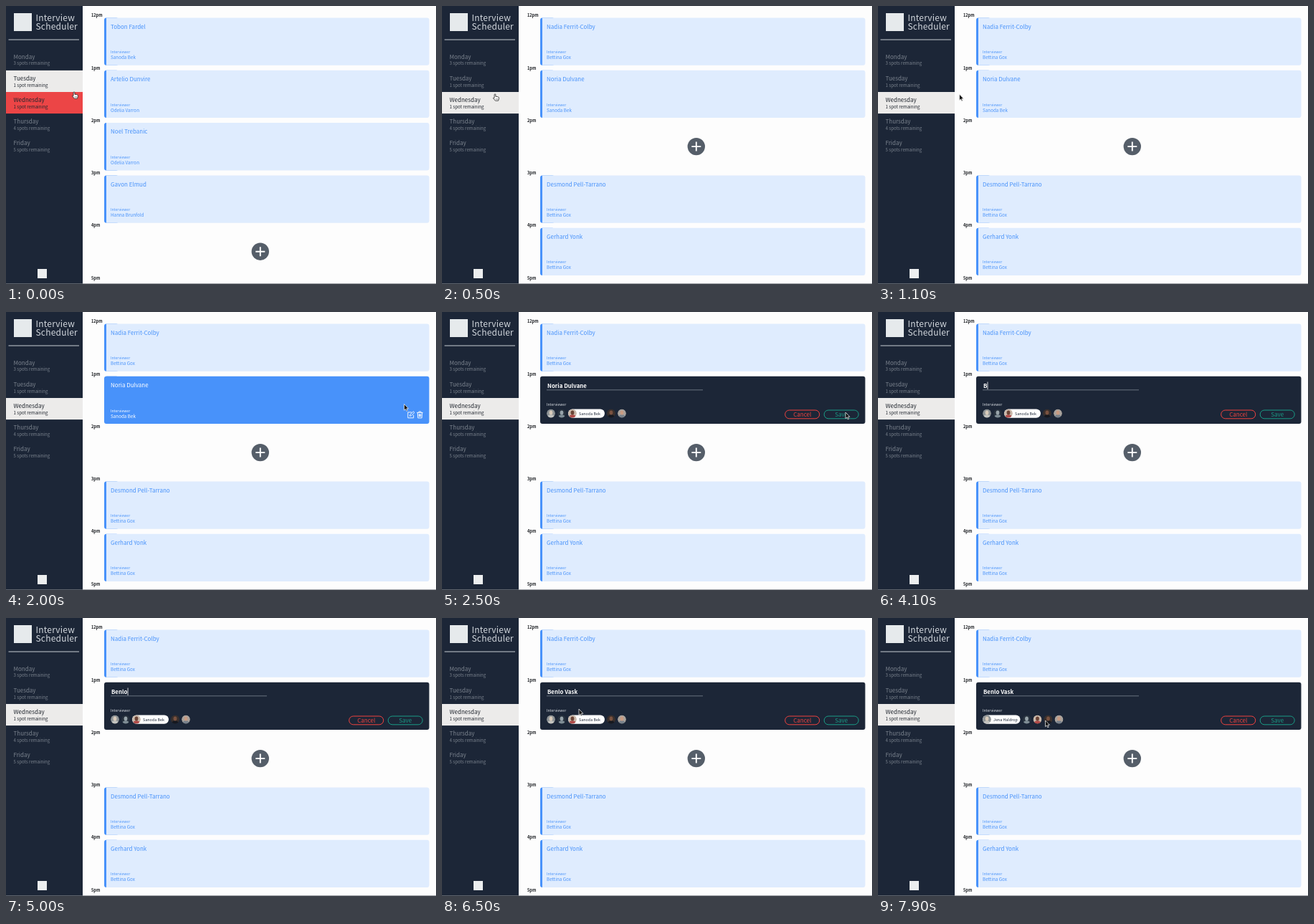
Write an HTML page that moves like this. It is 600 by 388 pixels and loops after 8000 ms.

```html
<!DOCTYPE html>
<html lang="en">
<head>
<meta charset="utf-8">
<title>Interview Scheduler</title>
<style>
  html, body { margin: 0; width: 100%; height: 100%; overflow: hidden; background: #fdfdfd; }
  svg { display: block; width: 600px; height: 388px; }
  text { font-family: "Noto Sans CJK JP", "Noto Sans CJK SC", "Noto Sans CJK", "Noto Sans", sans-serif; white-space: pre; }
</style>
</head>
<body>
<svg id="stage" viewBox="0 0 600 388" xmlns="http://www.w3.org/2000/svg">
  <defs>
    <clipPath id="round"><circle r="6"/></clipPath>
  </defs>
  <rect width="600" height="388" fill="#fdfdfd"/>
  <g id="board"></g>
  <g id="form">
    <rect x="137" y="89.8" width="453.5" height="66.3" rx="3" fill="#1c2637"/>
    <rect id="selection" x="146.5" y="97" height="11.5" fill="#5c82ae"/>
    <path d="M146 108.8H364" stroke="#7d8692" stroke-width=".8"/>
    <text id="field" x="147" y="106" font-size="7.9" font-weight="700" fill="#fff"></text>
    <rect id="caret" y="97.5" width=".8" height="10.5" fill="#fff"/>
    <text x="146" y="130.8" font-size="5.1" fill="#dfe3e8">Interviewer</text>
    <g id="people"></g>
    <g id="buttons"></g>
  </g>
  <g id="sidebar">
    <rect width="107" height="388" fill="#1c2637"/>
    <rect x="11" y="10" width="25" height="25" fill="#e6eaec"/>
    <g font-size="12" font-weight="300" fill="#d3d8de" letter-spacing=".2">
      <text x="41.5" y="21.3">Interview</text>
      <text x="41.5" y="32.7">Scheduler</text>
    </g>
    <path d="M3.5 47H102" stroke="#c9ced4" stroke-width="1"/>
    <g id="days"></g>
    <rect x="44" y="367" width="13" height="13" fill="#eceeef"/>
  </g>
  <path d="M0 387.6H600" stroke="#777c82" stroke-width=".8"/>
  <g id="cursor"></g>
</svg>
<script>
const LOOP = 8000;
const ROW = 73.3;
const BLUE = "#4892fa";
const $ = id => document.getElementById(id);

const days = [["Monday", 3], ["Tuesday", 1], ["Wednesday", 1], ["Thursday", 4], ["Friday", 5]];
const hours = ["12pm", "1pm", "2pm", "3pm", "4pm", "5pm"];
const bookings = {
  1: [["Tobon Fardel", "Sanoda Bek"], ["Artelio Dunvire", "Odelia Varron"],
      ["Noel Trebanic", "Odelia Varron"], ["Gavon Elmud", "Hanna Brunfold"], null],
  2: [["Nadia Ferrit-Colby", "Bettina Gox"], ["Noria Dulvane", "Sanoda Bek"], null,
      ["Desmond Pell-Tarrano", "Bettina Gox"], ["Gerhard Yonk", "Bettina Gox"]]
};
// Avatars: backdrop, head, shoulders; pill width and name where one gets selected.
const people = [
  { tones: ["#8f9496", "#d9cbbb", "#c4c4c0"], name: "Jena Haldrop", pill: 52.5 },
  { tones: ["#28323e", "#98a4aa", "#7f8d95"] },
  { tones: ["#c9b8aa", "#6b4436", "#b04a48"], name: "Sanoda Bek", pill: 51 },
  { tones: ["#3a302d", "#7a5240", "#15181f"] },
  { tones: ["#a9a29c", "#c99b83", "#78818b"] }
];

// Moments of the story, in ms.
const PICK_DAY = 300, OPEN_FORM = 2500, FOCUS = 2950, SELECT = 3100;
const HIDE = 3900, SHOW = 6250, PICK_PERSON = 7000;
const OLD_NAME = "Noria Dulvane", NEW_NAME = "Benlo Vask";
const keyTimes = [4000, 4200, 4400, 4600, 4800, 5500, 5600, 5700, 5850, 6000];

// Pointer tip: time, x, y.
const path = [
  [0, 95, 120], [500, 74, 123], [950, 74, 123], [1800, 548, 124], [2000, 555.5, 128.5],
  [2300, 563, 140], [2550, 563, 140], [3050, 241, 100], [SHOW, 241, 100],
  [6500, 191, 127], [6850, 153, 141], [7250, 153, 141], [7750, 233.5, 143], [LOOP, 233.5, 143]
];

const pointers = {
  arrow: `<path d="M0 0V8.6L2 6.9L3.3 9.8L4.7 9.2L3.4 6.3H6Z" fill="#111" stroke="#fff" stroke-width=".7"/>`,
  hand: `<path d="M-.9 4.6V.8a.9.9 0 0 1 1.8 0V3.3Q4.4 3.3 5.4 4.6V6.5L4.5 9.2H.4L-2.6 5.6Q-2.4 4.4-.9 5.4Z"
    fill="#fff" stroke="#222" stroke-width=".8"/><path d="M1 6V8M2.5 6V8M3.9 6V8" stroke="#222" stroke-width=".4"/>`,
  beam: `<path d="M-2-4.3Q0-4.3 0-3Q0-4.3 2-4.3M0-3V3M-2 4.3Q0 4.3 0 3Q0 4.3 2 4.3M-1.2 1H1.2"
    fill="none" stroke="#d5dae1" stroke-width="1"/>`
};

const text = (x, y, size, fill, str, extra = "") =>
  `<text x="${x}" y="${y}" font-size="${size}" fill="${fill}" ${extra}>${str}</text>`;

const rect = (x, y, w, h, fill, extra = "") =>
  `<rect x="${x}" y="${y}" width="${w}" height="${h}" fill="${fill}" ${extra}/>`;

function card(top, [name, interviewer], hover) {
  const ink = hover ? "#fff" : BLUE;
  const bg = hover ? BLUE : "#dfecfe";
  const icons = `<g transform="translate(560 ${top + 48.6})" fill="none" stroke="#fff" stroke-width=".9">
    <path d="M6 1.5H.8V9.4H8.7V5.4M3.4 6.8L3.9 4.7L8.4.4L10 2L5.5 6.3Z"/>
    <path d="M13.3 2H21.7M16 2V.6H19V2M14.3 2L14.8 9.5H20.2L20.7 2M16.2 3.8V7.8M17.5 3.8V7.8M18.8 3.8V7.8"/></g>`;
  return rect(137, top, 20, 66.3, BLUE, 'rx="3"') +
    `<path d="M140 ${top}H587.5a3 3 0 0 1 3 3v60.3a3 3 0 0 1-3 3H140Z" fill="${bg}"/>` +
    text(146, top + 15.3, 8, ink, name) +
    text(146, top + 49.7, 5.1, ink, "Interviewer", 'font-weight="300"') +
    text(146, top + 57.7, 6.3, ink, interviewer) +
    (hover ? icons : "");
}

function plus(top) {
  const y = top + 33;
  return `<circle cx="354.8" cy="${y}" r="12.2" fill="#555e69"/>
    <path d="M348.3 ${y}H361.3M354.8 ${y - 6.5}V${y + 6.5}" stroke="#fff" stroke-width="1.9"/>`;
}

function drawBoard(day, hoverRow, editing) {
  const labels = hours.map((h, i) =>
    text(119, 15.2 + ROW * i, 5.6, "#16191d", h, 'font-weight="700"')).join("");
  const slots = bookings[day].map((b, i) => {
    const top = 16.5 + ROW * i;
    if (!b) return plus(top);
    return editing && i === 1 ? "" : card(top, b, i === hoverRow);
  }).join("");
  return labels + slots;
}

function drawDays(day, hoverDay) {
  return days.map(([name, n], i) => {
    const top = 59.8 + 30.1 * i;
    const bg = i === day ? "#ecebea" : i === hoverDay ? "#ec4546" : "";
    const ink = bg ? "#20262e" : "#7b838e";
    return (bg ? rect(0, top, 107, 30.1, bg) : "") +
      text(10.5, top + 13.9, 8, ink, name) +
      text(10.5, top + 22.6, 6.15, ink, `${n} spot${n > 1 ? "s" : ""} remaining`, 'font-weight="300"');
  }).join("");
}

function avatar(x, [back, head, body]) {
  return `<g transform="translate(${x} 141.6)" clip-path="url(#round)">
    <circle r="6" fill="${back}"/><ellipse cy="6" rx="5" ry="4.4" fill="${body}"/>
    <ellipse cy="-1" rx="2.4" ry="3" fill="${head}"/></g>`;
}

function drawPeople(chosen) {
  let x = 146;
  return people.map((p, i) => {
    const left = x, picked = i === chosen;
    x += (picked ? p.pill : 12) + 3;
    return (picked ? rect(left, 135.5, p.pill, 12.2, "#fff", 'rx="6.1"') +
      text(left + 15, 143.7, 5.4, "#1c2637", p.name) : "") + avatar(left + 6, p.tones);
  }).join("");
}

const button = (x, color, label) =>
  rect(x, 137, 48, 11.8, "none", `rx="5.9" stroke="${color}" stroke-width="1"`) +
  text(x + 24, 145.8, 8, color, label, 'text-anchor="middle"');

function pointerAt(t) {
  const i = path.findIndex(k => k[0] > t);
  const [t0, x0, y0] = path[i - 1], [t1, x1, y1] = path[i];
  const u = (t - t0) / (t1 - t0), e = u * u * (3 - 2 * u);
  return [x0 + (x1 - x0) * e, y0 + (y1 - y0) * e];
}

// Redraws a group only when its state differs.
const drawn = {};
function update(id, draw, ...state) {
  const key = state.join();
  if (drawn[id] === key) return;
  drawn[id] = key;
  $(id).innerHTML = draw(...state);
}

const show = (id, on) => $(id).setAttribute("visibility", on ? "inherit" : "hidden");

function drawField(t) {
  const typed = keyTimes.filter(k => k <= t);
  const value = typed.length ? NEW_NAME.slice(0, typed.length) : OLD_NAME;
  const field = $("field");
  if (field.textContent !== value) field.textContent = value;
  const width = field.getComputedTextLength();
  const selected = t >= SELECT && !typed.length;
  const since = t - (typed.length ? typed[typed.length - 1] : FOCUS);
  const focused = t >= FOCUS && t < PICK_PERSON;
  $("selection").setAttribute("width", width + 1);
  $("caret").setAttribute("x", 147.2 + width);
  show("selection", selected);
  show("caret", focused && !selected && since % 1000 < 500);
}

function render(t) {
  const [x, y] = pointerAt(t);
  const day = t < PICK_DAY ? 1 : 2;
  const editing = t >= OPEN_FORM;
  const inSidebar = x < 107;
  const inField = editing && x > 146 && x < 364 && y > 95 && y < 109;
  const onIcon = !editing && x > 559 && y > 137;
  const hoverDay = inSidebar ? Math.floor((y - 59.8 + .2) / 30.1) : -1;
  const hoverRow = !editing && x > 137 && x < 590 ? 1 : -1;

  update("days", drawDays, day, hoverDay);
  update("board", drawBoard, day, hoverRow, editing ? 1 : 0);
  update("people", drawPeople, t < PICK_PERSON ? 2 : 0);
  update("cursor", kind => pointers[kind], inSidebar || onIcon ? "hand" : inField ? "beam" : "arrow");
  $("cursor").setAttribute("transform", `translate(${x} ${y})`);
  show("cursor", t < HIDE || t >= SHOW);
  show("form", editing);
  drawField(t);
}

$("buttons").innerHTML = button(478.7, "#f0433f", "Cancel") + button(533.2, "#1a9c86", "Save");

const start = performance.now();
function tick() {
  render((performance.now() - start) % LOOP);
  requestAnimationFrame(tick);
}
tick();
</script>
</body>
</html>
```
